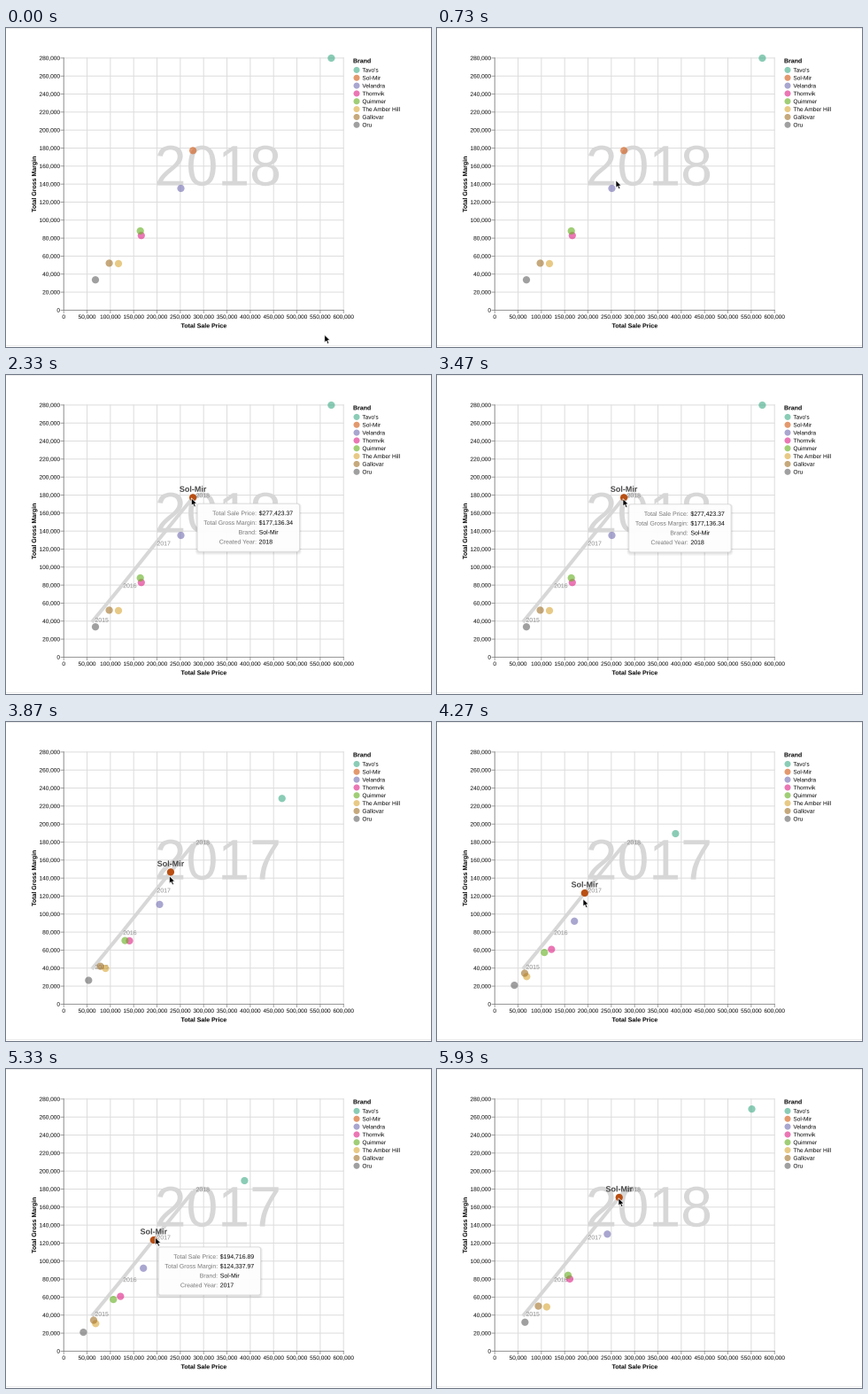
Write a matplotlib script that moves like this. It is 480 by 360 pixels and loops after 5.99 s.

```python
import numpy as np
import matplotlib.pyplot as plt
from matplotlib.animation import FuncAnimation
from matplotlib.colors import to_rgb
from matplotlib.patches import Circle, FancyBboxPatch, Polygon
from matplotlib.patheffects import Normal

W, H, DPI = 480, 360, 100
FRAMES, LOOP = 90, 5990
PT = 72 / DPI  # points per pixel

plt.rcParams["font.family"] = "Liberation Sans"
plt.rcParams["text.hinting"] = "none"
plt.rcParams["toolbar"] = "None"

fig = plt.figure(figsize=(W / DPI, H / DPI), dpi=DPI, facecolor="white")
ax = fig.add_axes([0, 0, 1, 1])
ax.set_xlim(0, W)
ax.set_ylim(H, 0)
ax.axis("off")

# name, colour, position in 2018, position in 2017
BRANDS = [
    ("Tavo's", "#42ad89", (367.4, 34.0), (269.4, 126.0)),
    ("Sol-Mir", "#d25a16", (211.1, 138.3), (166.8, 193.0)),
    ("Velandra", "#7570b3", (197.5, 181.0), (155.2, 224.8)),
    ("Thornvik", "#e02488", (152.8, 234.2), (129.3, 256.6)),
    ("Quimmer", "#66b022", (151.7, 229.0), (121.3, 260.1)),
    ("The Amber Hill", "#daaa3c", (127.0, 265.9), (101.3, 287.3)),
    ("Gallovar", "#a3742c", (116.6, 265.4), (99.0, 283.5)),
    ("Oru", "#666668", (101.0, 284.2), (87.4, 297.1)),
]
SOL, VEL = 1, 2
TRAILS = {
    VEL: [(90.5, 291.5), (122.5, 258.6), (155.4, 224.6), (197.5, 181)],
    SOL: [(97, 278.8), (128.7, 240.2), (167, 192.4), (211.1, 138.3)],
}
DOT_ALPHA = 0.62
PALE = "#d7d7d7"

# drawing text as outlines keeps sub-pixel letter positions
OUTLINE = [Normal()]


def label(x, y, s, size=6.5, color="black", ha="left", bold=False, z=2):
    """Text whose capitals are centred on y; size in pixels."""
    return ax.text(x, y + 0.355 * size, s, fontsize=size * PT, color=color,
                   ha=ha, va="baseline", weight="bold" if bold else "normal",
                   zorder=z, parse_math=False, path_effects=OUTLINE)


def line(xs, ys, color, width=1.0, z=1, **kw):
    return ax.plot(xs, ys, color=color, lw=width * PT, zorder=z,
                   snap=False, **kw)[0]


def px(value):
    return 65.2 + value * 316 / 600000


def py(value):
    return 318.4 - value * 284.5 / 280000


def ease(u):
    u = np.clip(u, 0, 1)
    return u * u * (3 - 2 * u)


def draw_chart():
    for y in (0.5, 358.5):
        line([0, W], [y, y], "#ececec")
    left, right, top, bottom = px(0), px(600000), py(280000), py(0)
    for v in range(0, 600001, 50000):
        x = px(v)
        line([x, x], [top, bottom], "#dddddd")
        line([x, x], [bottom, bottom + 3.2], "#888888", 0.8, 1.2)
        label(x, 325.8, f"{v:,}", ha="center")
    for v in range(0, 280001, 20000):
        y = py(v)
        line([left, right], [y, y], "#dddddd")
        line([left - 3.2, left], [y, y], "#888888", 0.8, 1.2)
        label(61, y, f"{v:,}", ha="right")
    line([left, left], [top, bottom], "#888888", 0.8, 1.2)
    line([left, right], [bottom, bottom], "#888888", 0.8, 1.2)
    label(223.4, 335.8, "Total Sale Price", 7, ha="center", bold=True)
    ax.text(34, 176.2, "Total Gross Margin", fontsize=7 * PT, weight="bold",
            rotation=90, rotation_mode="anchor", ha="center", va="baseline",
            path_effects=OUTLINE)
    label(392, 36.9, "Brand", 7, bold=True)
    for i, (name, color, *_) in enumerate(BRANDS):
        y = 47.4 + 8.84 * i
        ax.add_patch(Circle((396, y), 3.5, fc=color, ec="none",
                            alpha=DOT_ALPHA))
        label(402.4, y, name)


class Tooltip:
    WIDTH, HEIGHT = 115.3, 54
    KEYS = ("Total Sale Price:", "Total Gross Margin:", "Brand:",
            "Created Year:")

    def __init__(self):
        self.boxes = []
        for grow, drop in ((2.4, 1.6), (1.6, 1.2), (0.8, 0.8)):
            self.add_box(grow, drop, fc="black", ec="none", alpha=0.04)
        self.add_box(0, 0, fc="white", ec="#dadada", lw=0.8 * PT, alpha=0.96)
        self.keys = [label(0, 0, k, 6.9, "#777777", "right", z=21)
                     for k in self.KEYS]
        self.values = [label(0, 0, "", 6.9, z=21) for _ in self.KEYS]

    def add_box(self, grow, drop, **style):
        box = FancyBboxPatch((0, 0), 1, 1, zorder=20, **style,
                             boxstyle=f"round,pad=0,rounding_size={2.5 + grow}")
        ax.add_patch(box)
        self.boxes.append((box, grow, drop))

    def place(self, pos, rows):
        for art in [b[0] for b in self.boxes] + self.keys + self.values:
            art.set_visible(pos is not None)
        if pos is None:
            return
        x, y = pos
        for box, grow, drop in self.boxes:
            box.set_bounds(x - grow, y - grow + drop,
                           self.WIDTH + 2 * grow, self.HEIGHT + 2 * grow)
        for i, row in enumerate(rows):
            base = y + 10.6 + 10.75 * i + 0.355 * 6.9
            self.keys[i].set_position((x + 66.8, base))
            self.values[i].set_position((x + 69.6, base))
            self.values[i].set_text(row)


# first frame, last frame, offset from the pointer, rows
TIPS = [
    (13, 25, (6.5, 7.2),
     ("$251,690.00", "$135,206.19", BRANDS[VEL][0], "2018")),
    (35, 52, (6.8, 6.4),
     ("$277,423.37", "$177,136.34", BRANDS[SOL][0], "2018")),
    (76, 80, (3.6, 11),
     ("$194,716.89", "$124,337.97", BRANDS[SOL][0], "2017")),
]

# pointer path outside the drags: frame, x, y
PATH = np.array([
    (0, 359.8, 346.2), (2, 336, 312), (4, 278, 228), (6, 219, 155),
    (7, 205, 142), (9, 203.5, 168), (12, 199, 179), (14, 198, 180.5),
    (24, 198, 180.5), (27, 200.5, 175), (30, 205, 157), (33, 208.3, 144.5),
    (35, 209.3, 138.8), (38, 209.3, 138.8), (42, 210, 139.5),
    (52, 210, 139.5), (63, 165, 199.5), (72, 165, 199.5),
    (76, 171.2, 190.5), (79, 168.6, 190), (80, 168.6, 190),
])
TOP = np.array([210, 139.5])


def year_mix(f):
    """1 shows 2018, 0 shows 2017; dragging blends between them."""
    return 1 - ease((f - 52) / 11) if f < 72 else ease((f - 80) / 11.5)


def pointer(f):
    t = year_mix(f)
    if 52 <= f <= 63:
        low = np.array([165, 199.5])
    elif f >= 80:
        low = np.array([168.6, 190])
    else:
        return np.array([np.interp(f, PATH[:, 0], PATH[:, k])
                         for k in (1, 2)])
    return low + (TOP - low) * t


def hovered(f):
    if 12 <= f < 27:
        return VEL
    return SOL if f >= 34 else None


draw_chart()
year = ax.text(239.3, 177.6, "2018", fontsize=64.4 * PT, color=PALE,
               ha="center", va="baseline", zorder=3, path_effects=OUTLINE)
trail = line([], [], PALE, 4, 4, solid_capstyle="butt",
             solid_joinstyle="round")
marks = [label(0, 0, str(2015 + i), 6.9, "#8c8c8c", z=5) for i in range(4)]
dots = [Circle((0, 0), 4.1, ec="none", zorder=6) for _ in BRANDS]
for dot in dots:
    ax.add_patch(dot)
name_tag = label(0, 0, "", 9, "#484848", "center", True, 8)
tip = Tooltip()
ARROW = np.array([(0, 0), (0, 8.8), (2, 6.9), (3.4, 10.2), (5, 9.5),
                  (3.6, 6.4), (6.3, 6.3)])
cursor = Polygon(ARROW, fc="black", ec="white", lw=0.7 * PT, zorder=30)
ax.add_patch(cursor)


def update(f):
    t = year_mix(f)
    hot = hovered(f)
    year.set_text("2018" if t >= 0.5 else "2017")

    for i, (_, color, late, early) in enumerate(BRANDS):
        shade, alpha = (0.88, 1) if i == hot else (1, DOT_ALPHA)
        dots[i].center = tuple(np.array(early) * (1 - t) + np.array(late) * t)
        dots[i].set_facecolor((*np.array(to_rgb(color)) * shade, alpha))

    for art in [trail, name_tag] + marks:
        art.set_visible(hot is not None)
    if hot is not None:
        points = TRAILS[hot]
        trail.set_data(*zip(*points))
        for mark, (x, y) in zip(marks, points):
            mark.set_position((x + 3.5, y - 2.5 + 0.355 * 6.9))
        x, y = dots[hot].center
        name_tag.set_text(BRANDS[hot][0])
        name_tag.set_position((x, y - 9.7 + 0.355 * 9))

    pos = pointer(f)
    cursor.set_xy(ARROW + pos)
    tip.place(None, ())
    for first, last, offset, rows in TIPS:
        if first <= f <= last:
            tip.place(pos + offset, rows)
    return []


anim = FuncAnimation(fig, update, frames=FRAMES, interval=LOOP / FRAMES,
                     init_func=lambda: update(0), repeat=True, repeat_delay=0,
                     blit=False)
plt.show()
```
